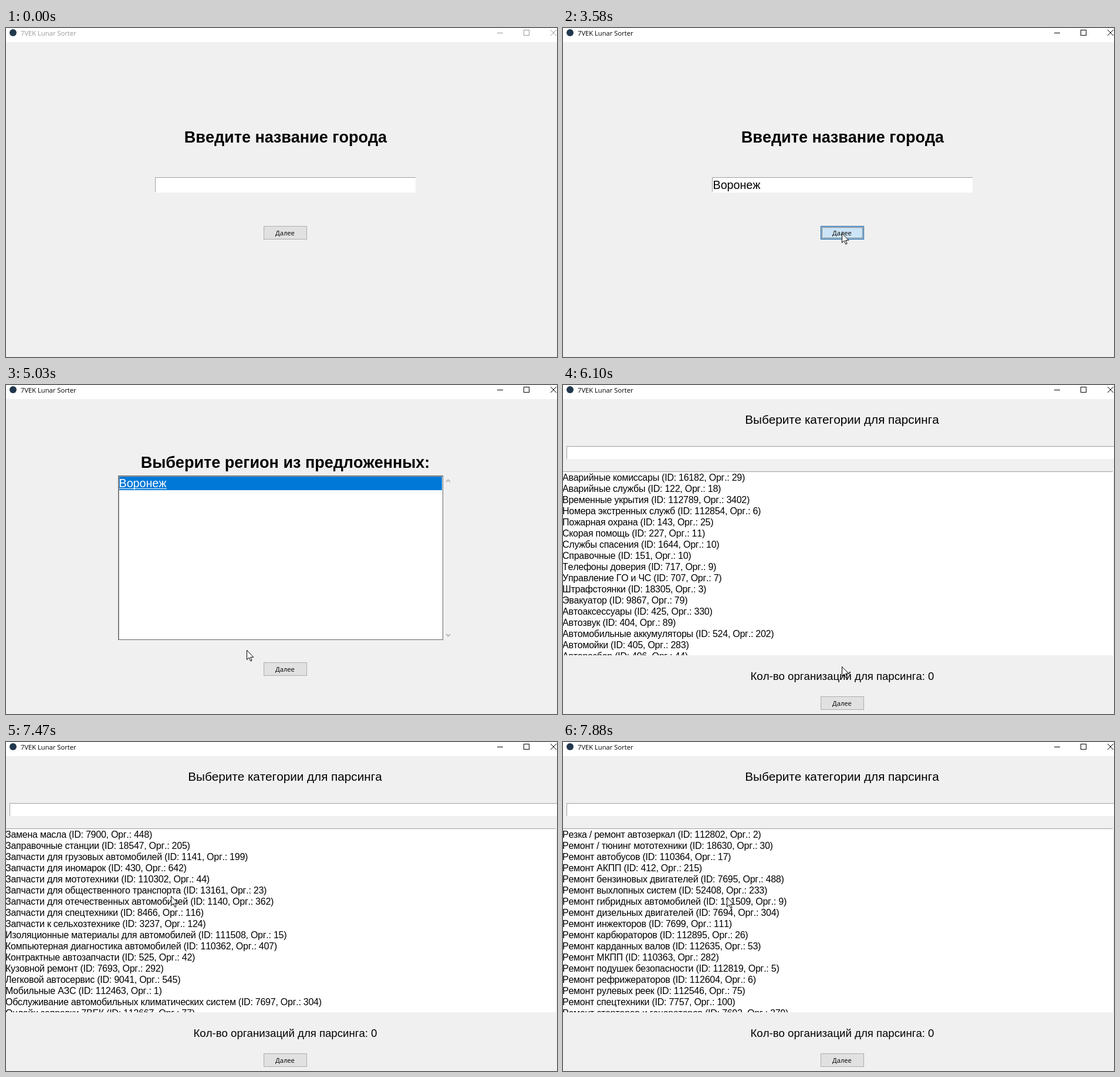
An HTML page for the animation above (8 s loop, 939 by 560 pixels).

```html
<!DOCTYPE html>
<html lang="ru">
<head>
<meta charset="utf-8">
<title>7VEK Lunar Sorter</title>
<style>
  html, body { margin: 0; width: 100%; height: 100%; overflow: hidden; background: #f0f0f0; }
  svg { display: block; width: 939px; height: 560px; }
  text { font-family: "Liberation Sans", Arial, sans-serif; font-kerning: none; white-space: pre; }
  .ui { font: 11.2px "Open Sans", "Noto Sans", sans-serif; }
  .mid { text-anchor: middle; }
  .head { font-size: 27px; font-weight: bold; }
  .field { font-size: 19.7px; }
  .row { font-size: 16px; letter-spacing: -.25px; }
  .crisp { shape-rendering: crispEdges; }
  .edge { fill: none; stroke: #a0a0a0; }
  #chrome { color: #999; }
  #chrome.on { color: #000; }
  #chrome text { fill: currentColor; }
  #chrome path { fill: none; stroke: currentColor; }
  #face { fill: #e1e1e1; stroke: #adadad; }
  .hover #face { fill: #e5f1fb; stroke: #0078d7; }
  .press #face { fill: #cce4f7; stroke: #005499; }
  #dots { fill: none; stroke: #000; stroke-dasharray: 1 1; stroke-dashoffset: .5; }
</style>
</head>
<body>
<svg viewBox="0 0 939 560">
  <defs><clipPath id="listClip"><rect y="148" width="938" height="312"/></clipPath></defs>
  <rect width="939" height="560" fill="#f0f0f0"/>

  <g id="chrome">
    <rect width="939" height="24" fill="#fff"/>
    <circle cx="12" cy="8" r="6" fill="#22384d"/>
    <text class="ui" x="25" y="13">7VEK Lunar Sorter</text>
    <path class="crisp" d="M837 8.5h10M882.5 3.5h9v9h-9z"/>
    <path d="M928 3l10 10M938 3l-10 10"/>
  </g>

  <g id="page0">
    <text class="head mid" x="476.5" y="195">Введите название города</text>
    <rect x="254" y="254" width="444" height="26" fill="#fff"/>
    <path class="crisp edge" d="M254.5 279v-24.5h443"/>
    <text class="field" id="typed" x="255.5" y="274"></text>
    <rect id="caret" y="256" width="2" height="22"/>
  </g>

  <g id="page1">
    <text class="head mid" x="476" y="141">Выберите регион из предложенных:</text>
    <rect x="192" y="155" width="552" height="278" fill="#fff"/>
    <path class="crisp edge" d="M192.5 433v-277.5h551"/>
    <rect id="ring" class="crisp" x="191.5" y="154.5" width="553" height="279" fill="none" stroke="#646464"/>
    <rect id="mark" x="193" y="156" width="550" height="23" fill="#0078d7"/>
    <text class="field" id="region" x="192.5" y="174">Воронеж</text>
    <rect id="under" x="193" y="176" width="81" height="1" fill="#fff"/>
    <path d="M750 165l3.5-3.5 3.5 3.5M750 424l3.5 3.5 3.5-3.5" fill="none" stroke="#b8b8b8" stroke-width="2"/>
  </g>

  <g id="page2">
    <text class="mid" x="475.5" y="66" font-size="20.7">Выберите категории для парсинга</text>
    <rect x="6" y="104" width="933" height="22" fill="#fff"/>
    <path class="crisp edge" d="M6.5 126v-21.5h933"/>
    <rect y="147" width="938" height="313" fill="#fff"/>
    <rect y="147" width="937" height="1" fill="#a0a0a0"/>
    <rect x="938" y="148" width="1" height="312" fill="#e3e3e3"/>
    <g clip-path="url(#listClip)"><g id="list"></g></g>
    <text class="mid" x="476" y="502" font-size="18.6">Кол-во организаций для парсинга: 0</text>
  </g>

  <g id="button">
    <rect id="face" class="crisp" x="439.5" y=".5" width="73" height="22"/>
    <rect id="dots" class="crisp" x="441.5" y="2.5" width="69" height="18"/>
    <text class="ui mid" x="475.5" y="16">Далее</text>
  </g>

  <g id="cursor">
    <path id="beam" class="crisp" d="M-3 -7.5h3M1 -7.5h3M.5 -7v14M-3 7.5h3M1 7.5h3" fill="none" stroke="#000"/>
    <path id="arrow" d="M.5 .5v16l3.7-3.5 2.6 6 2.3-1-2.5-5.7h5.2z" fill="#fff" stroke="#000"/>
  </g>
</svg>

<script>
const LOOP = 8000, STEP = 67.3;
const $ = id => document.getElementById(id);
const show = (id, on) => { $(id).style.display = on ? '' : 'none'; };

// Name, then id and count; rows without numbers get seeded ones.
const rows = `Аварийные комиссары|16182|29
Аварийные службы|122|18
Временные укрытия|112789|3402
Номера экстренных служб|112854|6
Пожарная охрана|143|25
Скорая помощь|227|11
Службы спасения|1644|10
Справочные|151|10
Телефоны доверия|717|9
Управление ГО и ЧС|707|7
Штрафстоянки|18305|3
Эвакуатор|9867|79
Автоаксессуары|425|330
Автозвук|404|89
Автомобильные аккумуляторы|524|202
Автомойки|405|283
Авторазбор|406|44
Авторемонт
Автосигнализации
Автостёкла
Автостоянки
Автотовары
Автохимия
Автоэкспертиза
Автоэлектрика
Аренда автобусов
Аренда автомобилей
Аренда спецтехники
Аэрография
Беспокрасочное удаление вмятин
Велосипеды
Восстановление деталей
Вскрытие автомобилей
Выкуп автомобилей
Газовое оборудование и системы питания для автомобилей
Грузовой автосервис
Диски и шины
Доставка топлива
Заказ спецтехники
Замена автостёкол
Замена масла|7900|448
Заправочные станции|18547|205
Запчасти для грузовых автомобилей|1141|199
Запчасти для иномарок|430|642
Запчасти для мототехники|110302|44
Запчасти для общественного транспорта|13161|23
Запчасти для отечественных автомобилей|1140|362
Запчасти для спецтехники|8466|116
Запчасти к сельхозтехнике|3237|124
Изоляционные материалы для автомобилей|111508|15
Компьютерная диагностика автомобилей|110362|407
Контрактные автозапчасти|525|42
Кузовной ремонт|7693|292
Легковой автосервис|9041|545
Мобильные АЗС|112463|1
Обслуживание автомобильных климатических систем|7697|304
Онлайн заправки 7ВЕК|112667|77
Отогрев автомобилей
Переоборудование автомобилей
Покраска автомобилей
Полировка кузова
Пошив автомобильных чехлов
Прокат прицепов
Развал-схождение
Резка / ремонт автозеркал|112802|2
Ремонт / тюнинг мототехники|18630|30
Ремонт автобусов|110364|17
Ремонт АКПП|412|215
Ремонт бензиновых двигателей|7695|488
Ремонт выхлопных систем|52408|233
Ремонт гибридных автомобилей|111509|9
Ремонт дизельных двигателей|7694|304
Ремонт инжекторов|7699|111
Ремонт карбюраторов|112895|26
Ремонт карданных валов|112635|53
Ремонт МКПП|110363|282
Ремонт подушек безопасности|112819|5
Ремонт рефрижераторов|112604|6
Ремонт рулевых реек|112546|75
Ремонт спецтехники|7757|100
Ремонт стартеров и генераторов|7692|279`.split('\n');

rows.forEach((line, i) => {
  const [name, id = 400 + i * 7919 % 9000, count = 5 + i * 131 % 400] = line.split('|');
  const text = document.createElementNS('http://www.w3.org/2000/svg', 'text');
  text.setAttribute('class', 'row');
  text.setAttribute('x', -1);
  text.setAttribute('y', 163 + 19 * i);
  text.textContent = `${name} (ID: ${id}, Орг.: ${count})`;
  $('list').append(text);
});

// Keys are [tick, value, ...].
const path = [
  [2, 560, 511], [8, 462, 310], [12, 428, 254], [13, 428, 254], [14, 437, 259],
  [45, 437, 259], [49, 475, 349], [57, 475, 349], [66, 236, 168], [69, 236, 168],
  [75, 410, 451], [76, 430, 462], [82, 475, 479], [92, 475, 479], [102, 347, 247],
  [106, 347, 247], [108, 300, 258], [111, 281, 262], [117, 279, 264]
];
const scroll = [[106, 0], [107, 4], [111, 40], [117, 64]];
const typing = [[21, 1], [25, 2], [27, 3], [30, 4], [31, 5], [33, 6], [35, 7]];
const buttonY = [337, 472, 530];

function tween(keys, t) {
  if (t <= keys[0][0]) return keys[0].slice(1);
  const n = keys.findIndex(k => k[0] > t);
  if (n < 0) return keys[keys.length - 1].slice(1);
  const a = keys[n - 1], b = keys[n], p = (t - a[0]) / (b[0] - a[0]);
  return a.slice(1).map((v, i) => v + (b[i + 1] - v) * p);
}

function draw(ms) {
  const tick = Math.floor(ms / STEP + .3);
  const within = (a, b) => tick >= a && tick < b;
  const page = tick < 57 ? 0 : tick < 90 ? 1 : 2;
  for (let i = 0; i < 3; i++) show('page' + i, i === page);
  $('chrome').classList.toggle('on', tick >= 11);

  const [x, y] = tween(path, tick).map(Math.round);
  const beam = page === 0 && x > 253 && x < 698 && y > 253 && y < 280;
  show('cursor', tick >= 2);
  show('beam', beam);
  show('arrow', !beam);
  $('cursor').setAttribute('transform', `translate(${x} ${y})`);

  if (page === 0) {
    const last = typing.filter(k => k[0] <= tick).pop();
    const typed = $('typed');
    typed.textContent = 'Воронеж'.slice(0, last ? last[1] : 0);
    const end = last ? typed.getComputedTextLength() : 0;
    $('caret').setAttribute('x', Math.floor(255.5 + end));
    show('caret', within(20, 40) || within(46, 52));
  }
  if (page === 1) {
    const picked = tick >= 67, focus = within(67, 84);
    show('ring', focus);
    show('mark', picked);
    show('under', focus);
    $('region').setAttribute('fill', picked ? '#fff' : '#000');
  }
  if (page === 2) {
    const top = Math.round(tween(scroll, tick)[0] / 4) * 4;
    $('list').setAttribute('transform', `translate(0 ${-19 * top})`);
  }

  const by = buttonY[page];
  const over = tick >= 2 && x >= 439 && x < 513 && y >= by && y < by + 23;
  $('button').setAttribute('transform', `translate(0 ${by})`);
  $('button').classList.toggle('hover', over);
  $('button').classList.toggle('press', within(52, 55) || within(84, 86));
  show('dots', within(52, 57) || within(84, 90));
}

function frame() {
  draw(performance.now() % LOOP);
  requestAnimationFrame(frame);
}
frame();
</script>
</body>
</html>
```
